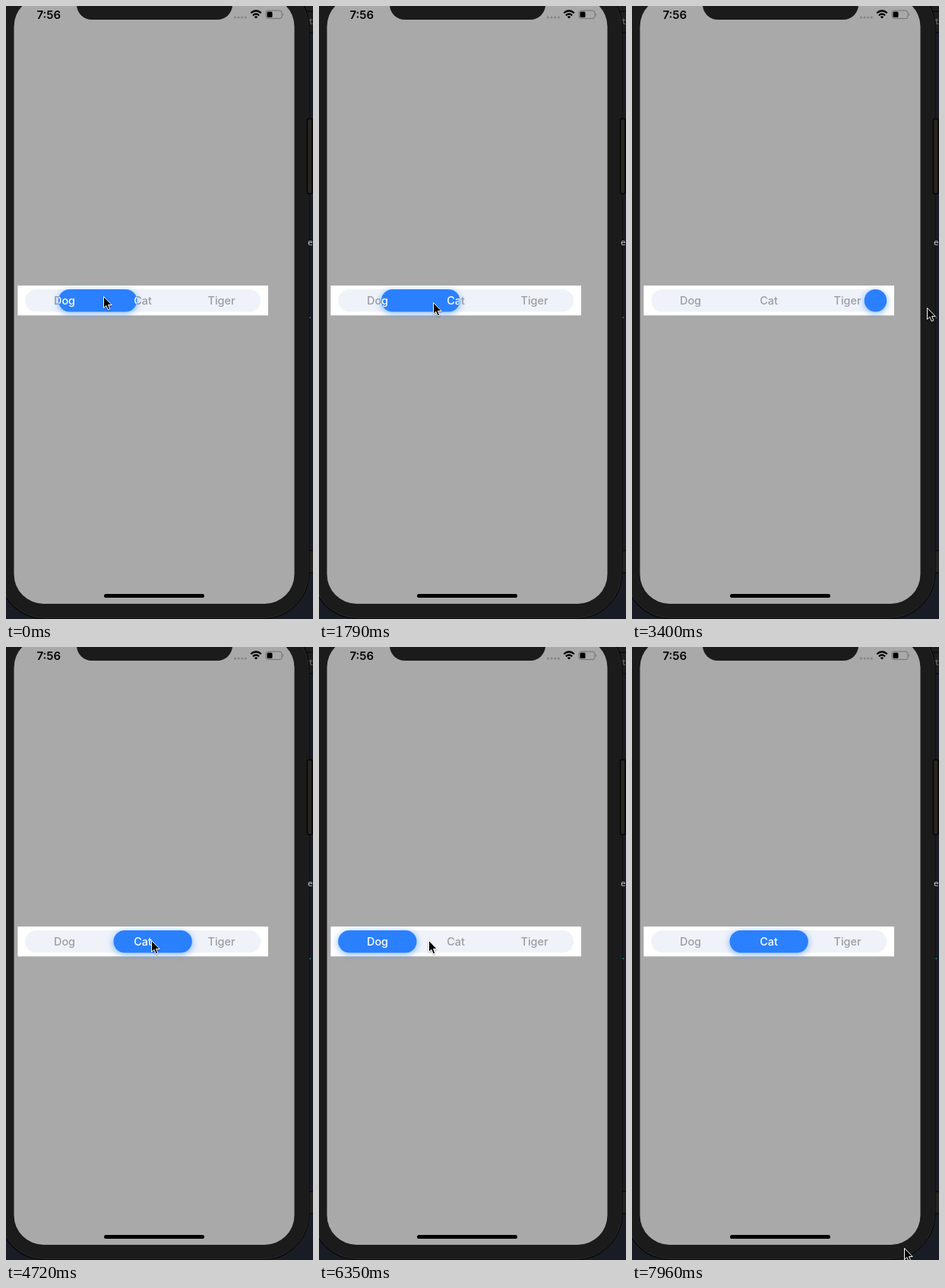
These frames come from a looping animation (404x807 px, 8 s). An HTML page:

```html
<!DOCTYPE html>
<html lang="en">
<head>
<meta charset="utf-8">
<title>Segmented control</title>
<style>
  html, body { margin: 0; width: 100%; height: 100%; overflow: hidden; background: #1a1c25; }
  svg { display: block; width: 100vw; height: 100vh; }
  text { font-family: Inter, Roboto, sans-serif; }
  .labels { font-size: 14.4px; font-weight: 500; text-anchor: middle; }
  .code text { font: 11px "DejaVu Sans Mono", monospace; }
  #pill { fill: #2b80ff; filter: drop-shadow(0 2.5px 5px rgba(43, 128, 255, .6)); }
  #cursor { filter: drop-shadow(0 1px 1px rgba(0, 0, 0, .35)); }
</style>
</head>
<body>
<svg viewBox="0 0 404 807">
  <defs>
    <clipPath id="pillClip"><rect id="clipRect" y="373" height="29.5" rx="14.75"/></clipPath>
    <g id="names">
      <text x="77" y="393">Dog</text>
      <text x="180" y="393">Cat</text>
      <text x="283.5" y="393">Tiger</text>
    </g>
  </defs>

  <!-- editor behind the phone -->
  <rect width="404" height="807" fill="#1a1c25"/>
  <rect x="390" width="14" height="35" fill="#1e1d1d"/>
  <path d="M390 7H404M390 35H404" stroke="#050505"/>
  <rect x="390" y="717" width="20" height="29" fill="#242322" stroke="#050505"/>

  <!-- phone -->
  <rect x="-9" y="-32" width="407.500" height="838" rx="60" fill="#1b1b1b" stroke="#080808" stroke-width="2"/>
  <rect x="-8" y="-31" width="406" height="836.500" rx="59" fill="none" stroke="#383838" stroke-width=".7"/>
  <rect x="396.500" y="148.500" width="6.500" height="98.500" rx="2" fill="#292622" stroke="#050505" stroke-width="1.500"/>
  <rect x="10.500" y="-12" width="369" height="799" rx="39" fill="#a9a9a9"/>
  <rect x="93" y="-40" width="205" height="58" rx="20" fill="#1b1b1b"/>
  <g class="code">
    <text x="398" y="24" fill="#777">t</text>
    <text x="397" y="315" fill="#ccc">ei</text>
    <text x="397" y="411" fill="#10a0a8">.c</text>
  </g>

  <!-- status bar -->
  <text x="56.300" y="16.500" font-size="15" font-weight="600" text-anchor="middle">7:56</text>
  <path d="M301.500 15H317" stroke="#858585" stroke-width="3" stroke-linecap="round" stroke-dasharray="0 4.600" fill="none"/>
  <g fill="none" stroke="#000" stroke-width="2.200">
    <path d="M322.200 9.300Q329 3.200 335.800 9.300"/>
    <path d="M324.900 12.300Q329 8.700 333.100 12.300"/>
  </g>
  <path d="M326.700 14.200Q329 12.400 331.300 14.200L329 16.600Z"/>
  <rect x="342" y="6" width="21" height="10.500" rx="3" fill="none" stroke="#707070"/>
  <rect x="343.500" y="7.500" width="7" height="7.500" rx="1.500"/>
  <path d="M364.300 9.500Q366.300 11.200 364.300 13Z" fill="#707070"/>
  <rect x="129" y="774" width="132" height="5" rx="2.500"/>

  <!-- segmented control -->
  <rect x="15.400" y="368" width="329.600" height="39.300" fill="#fff"/>
  <rect x="25.200" y="373" width="310" height="29.500" rx="14.750" fill="#eff3f9"/>
  <use href="#names" class="labels" fill="#9a9da3"/>
  <rect id="pill" y="373" height="29.500" rx="14.750"/>
  <g clip-path="url(#pillClip)"><use href="#names" class="labels" fill="#fff"/></g>

  <path id="cursor" d="M0 0V15L3.400 11.900 5.800 17.500 8.300 16.400 6 11H10.700Z" stroke="#fff"/>
</svg>
<script>
const LOOP = 8000, STEP = 147.5, LAST_STEP = 54;
const TRACK_LEFT = 25.2, TRACK_WIDTH = 310, SEGMENT = TRACK_WIDTH / 3, PILL_HEIGHT = 29.5;
const DOG = 0, CAT = 1, TIGER = 2;

// Places where the pointer rests: step, x, y
const STOPS = [
  [0, 128, 382], [12, 150, 390], [18, 196, 390], [23, 388, 397],
  [30, 300, 376], [32, 191, 386], [36, 280, 390], [38, 190, 428],
  [42, 85, 386], [43, 144, 386], [45, 172, 388], [54, 358, 791]
];
const RELEASE = 23;
const SELECTIONS = [[RELEASE, TIGER], [31, CAT], [36, TIGER], [39, DOG], [43.6, CAT]];
const SLIDE_STEPS = 2;

const byId = id => document.getElementById(id);
const pillRects = [byId('pill'), byId('clipRect')];
const cursor = byId('cursor');

const clamp01 = p => Math.max(0, Math.min(1, p));
const easeInOut = p => p * p * (3 - 2 * p);
const easeOut = p => 1 - (1 - p) ** 3;

function pointerAt(step) {
  const next = Math.max(1, STOPS.findIndex(stop => stop[0] >= step));
  const [t0, x0, y0] = STOPS[next - 1], [t1, x1, y1] = STOPS[next];
  const p = easeInOut((step - t0) / (t1 - t0));
  return [x0 + (x1 - x0) * p, y0 + (y1 - y0) * p];
}

function pillAt(step) {
  // The drag follows the pointer after a slightly slack start.
  const moved = pointerAt(Math.min(step, RELEASE))[0] - STOPS[0][1];
  let x = 69 + moved - Math.min(9, moved * 0.41);
  for (const [start, segment] of SELECTIONS) {
    const target = TRACK_LEFT + segment * SEGMENT;
    x += (target - x) * easeOut(clamp01((step - start) / SLIDE_STEPS));
  }
  return x;
}

function draw(time) {
  const step = Math.min(LAST_STEP, Math.floor((time % LOOP) / STEP + 0.06));
  // Dragged past the end, the pill squeezes down to a circle.
  const trackRight = TRACK_LEFT + TRACK_WIDTH;
  const left = Math.min(pillAt(step), trackRight - PILL_HEIGHT);
  const width = Math.min(SEGMENT, trackRight - left);
  for (const rect of pillRects) {
    rect.setAttribute('x', left);
    rect.setAttribute('width', width);
  }
  const [x, y] = pointerAt(step);
  cursor.setAttribute('transform', `translate(${x + 0.5} ${y + 0.5})`);
}

const start = performance.now();
function tick() {
  draw(performance.now() - start);
  requestAnimationFrame(tick);
}
tick();
</script>
</body>
</html>
```
